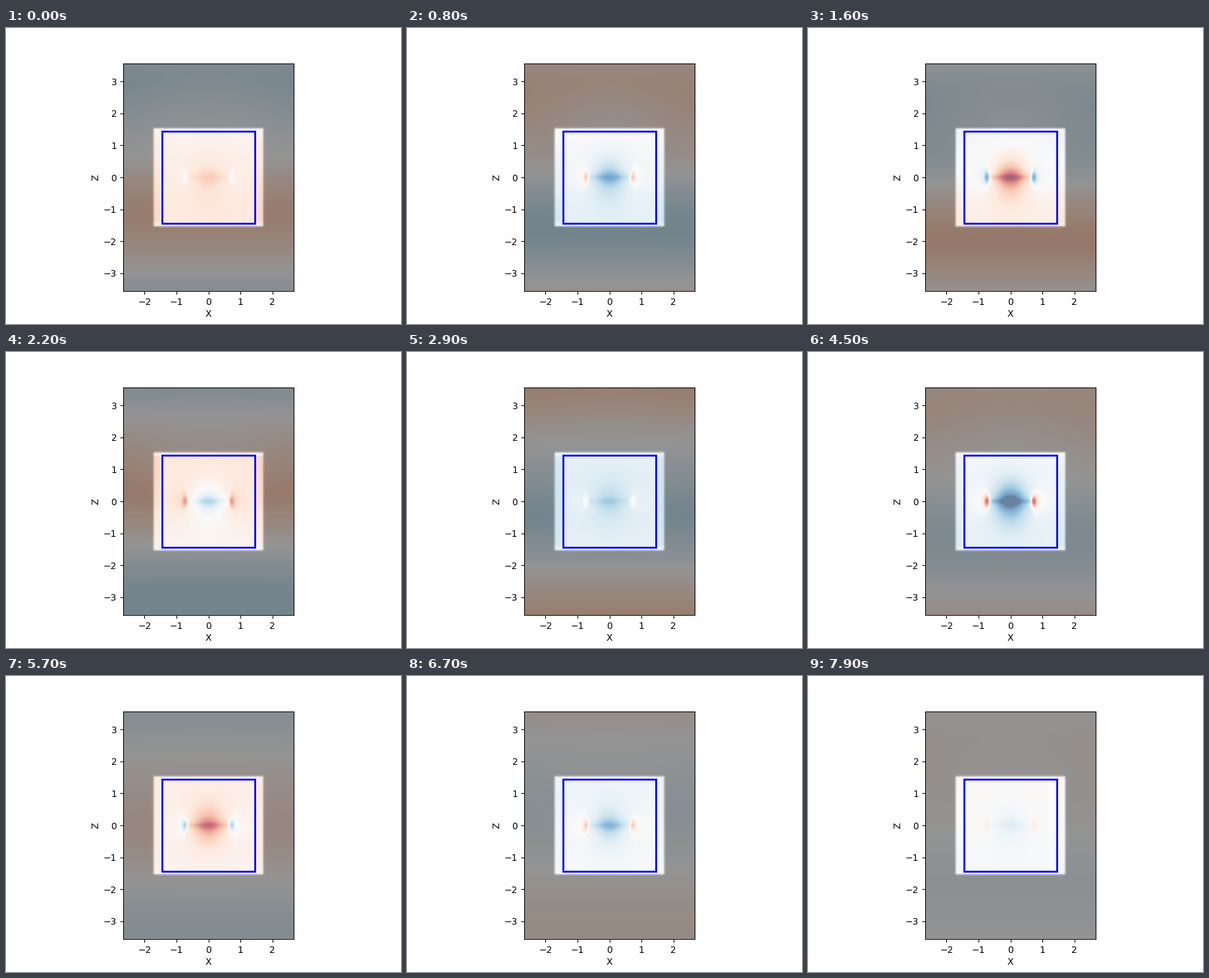
Write a matplotlib script that moves like this. It is 600x450 px and loops after 8000 ms.

```python
import numpy as np
import matplotlib
import matplotlib.pyplot as plt
from matplotlib.animation import FuncAnimation
from matplotlib.patches import Rectangle

FRAMES, STEP = 80, 100
WIDTH, HEIGHT = 600, 450
LEFT, BOTTOM, COLS, ROWS = 178, 50, 259, 346   # axes box in pixels
HALF_X, HALF_Z = 2.665, 3.565     # cell half sizes
BLOCK_X, BLOCK_Z = 1.72, 1.54     # low-index block
MONITOR = 1.45
ALPHA = 0.6

xs = np.linspace(-HALF_X, HALF_X, COLS)
zs = np.linspace(-HALF_Z, HALF_Z, ROWS)
X, Z = np.meshgrid(xs, zs)
AX, AZ = abs(X), abs(Z)
cmap = matplotlib.colormaps["RdBu_r"]


def step(u, width):
    return 0.5 * (1 + np.tanh(u / width))


def gauss(u, width):
    return np.exp(-(u / width) ** 2)


block = step(BLOCK_X - AX, 0.03) * step(BLOCK_Z - AZ, 0.03)
rim = (1 + 0.5 * step(AX - 1.52, 0.06)) * (1 - 0.55 * step(AZ - 1.43, 0.04))
shadow = 1 - 0.6 * gauss(Z - 1.9, 1.1) * gauss(X, 2.6)
path = Z - 0.5 * step(Z - 1, 0.5)   # the wave runs ahead behind the block


def dipole_shape():
    core = 0.3 * gauss(X, 0.5) * gauss(Z, 0.22)
    halo = 0.65 * gauss(X, 0.42 + 0.2 * AZ) * np.exp(-(AZ / 0.6) ** 1.4)
    bar = 0.16 * step(0.64 - AX, 0.03) * gauss(Z, 0.08)
    spots = 0.55 * gauss(AX - 0.74, 0.085) * gauss(Z, 0.17)
    outer = step(AX - 0.65 - 0.25 * AZ, 0.04)
    wings = 0.42 * outer * np.exp(-np.maximum(AX - 0.65, 0) / 0.3)
    return core + halo + bar - spots - wings * gauss(Z, 0.4)


dipole = dipole_shape()


def field(t):
    """Travelling pulse plus the ringing dipole, t in seconds."""
    pulse = 0.26 * gauss(t - 1.5, 5.5)
    phase = np.radians(200 * t - 60)
    outside = np.cos(phase - 2 * np.pi * path / 7) * shadow
    inside = 0.85 * np.cos(phase + 0.35 - 0.37 * Z) * rim
    wave = pulse * (outside * (1 - block) + inside * block)
    ring = (0.8 + 0.42 * gauss(t - 4.9, 3.2)) * np.cos(np.radians(76 + 185.6 * t))
    return wave + ring * dipole


def render(t):
    colors = cmap(0.5 + 0.5 * np.clip(field(t), -1, 1))[..., :3]
    return ALPHA * colors + (1 - ALPHA) * block[..., None]


fig = plt.figure(figsize=(WIDTH / 100, HEIGHT / 100), dpi=100)
ax = fig.add_axes((LEFT / WIDTH, BOTTOM / HEIGHT, COLS / WIDTH, ROWS / HEIGHT))
image = ax.imshow(render(0), origin="lower", interpolation="nearest", aspect="auto",
                  extent=(-HALF_X, HALF_X, -HALF_Z, HALF_Z))
ax.add_patch(Rectangle((-MONITOR, -MONITOR), 2 * MONITOR, 2 * MONITOR,
                       fill=False, ec="blue", lw=2))
ax.spines["bottom"].set_color("#500008")
ax.set_xticks(range(-2, 3))
ax.set_yticks(range(-3, 4))
ax.set_xlabel("X", labelpad=3)
ax.set_ylabel("Z", labelpad=3)


def update(i):
    image.set_data(render(i * STEP / 1000))
    return [image]


anim = FuncAnimation(fig, update, frames=FRAMES, interval=STEP,
                     repeat=True, repeat_delay=0)
plt.show()
```
